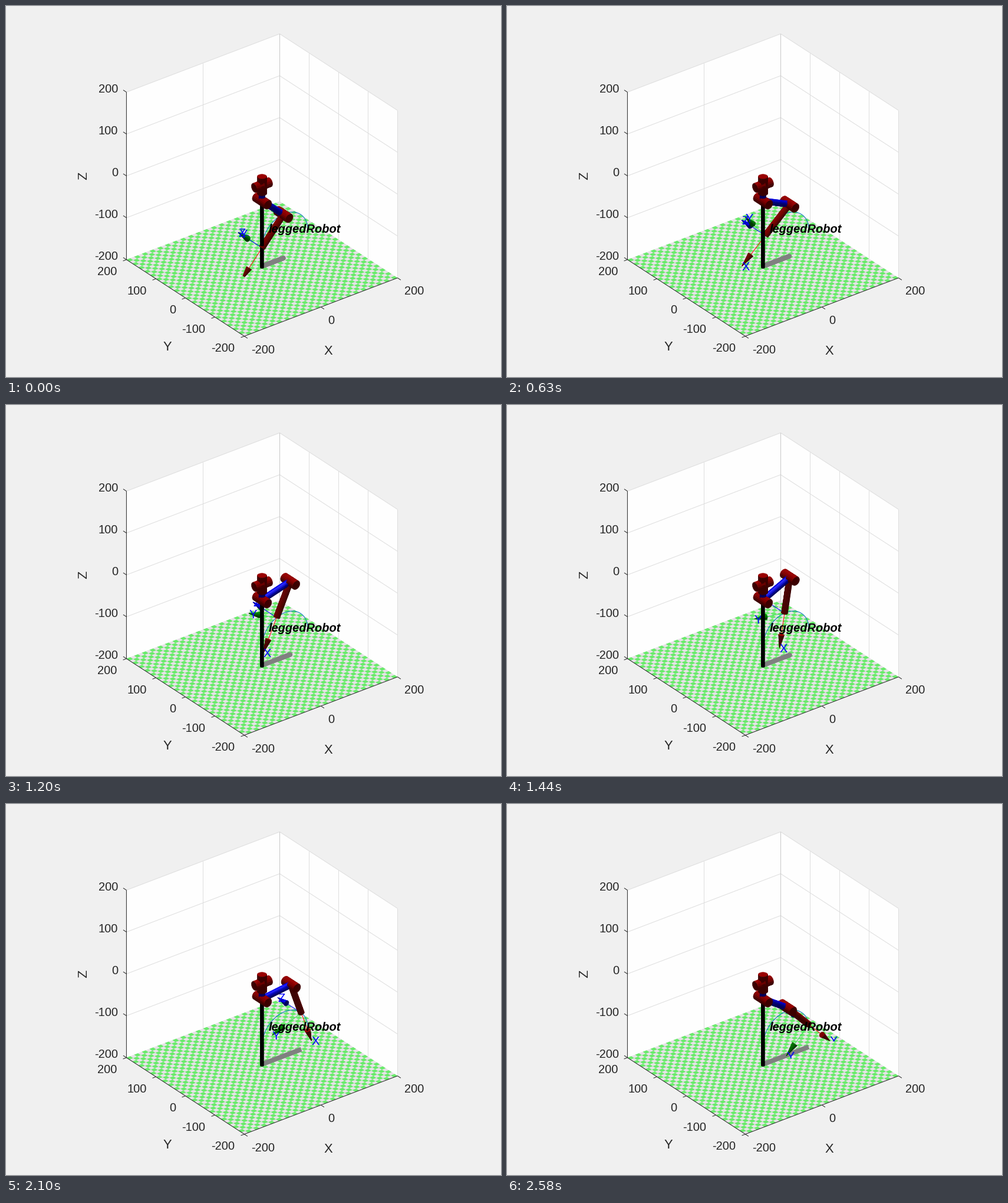
These frames come from a looping animation (840 px wide and 630 px high, 2610 ms). A matplotlib script:

```python
import numpy as np
import matplotlib.pyplot as plt
from matplotlib.animation import FuncAnimation
from matplotlib.collections import LineCollection, PolyCollection
from matplotlib.transforms import Bbox

W, H, DPI = 840, 630, 100
FRAMES, INTERVAL = 87, 30
FLOOR = -200
HIP = np.array([0, 0, -38.0])
THIGH, SHIN = 76, 82
ARROW, HEAD = 80, 30
STEP = np.radians(2.22)          # cruise speed along the foot path
RAMP = 13.6                      # frames spent accelerating

RED, GREEN, BLUE, BLACK = np.array(
    [(1, 0, 0), (0, 1, 0), (0, 0, 1.55), (0, 0, 0)])
INK = "#262626"
TO_EYE = np.array([-0.527, -0.687, 0.5])
HALFWAY = np.array([-0.304, -0.397, 0.866])


def project(points):
    p = np.asarray(points, float)
    x, y, z = p[..., 0], p[..., 1], p[..., 2]
    return np.stack([434.4 + 0.65 * x - 0.5 * y,
                     304 - 0.2475 * x - 0.325 * y - 0.711 * z], -1)


def px(size):
    return size * 72 / DPI


# ---------- solids ----------
def shade(normal, color):
    light = 0.23 + 0.37 * max(normal[2], 0)
    gloss = 0.2 * max(normal @ HALFWAY, 0) ** 20
    return np.clip(color * light + gloss * (color[2] > 0), 0, 1)


def tube(start, end, r0, r1, color, rings=4, sides=18):
    """Visible faces of a capped tube as (depth, outline, colour, centre z)."""
    start, end = np.asarray(start, float), np.asarray(end, float)
    axis = (end - start) / np.linalg.norm(end - start)
    helper = np.array([0, 0, 1.0]) if abs(axis[2]) < 0.9 else np.array([1.0, 0, 0])
    u = np.cross(helper, axis)
    u /= np.linalg.norm(u)
    v = np.cross(axis, u)
    a = np.linspace(0, 2 * np.pi, sides + 1)[:, None]
    circle = np.cos(a) * u + np.sin(a) * v
    t = np.linspace(0, 1, rings + 1)
    loops = [start + (end - start) * k + circle * (r0 + (r1 - r0) * k) for k in t]

    faces = []

    def add(outline, normal):
        if normal @ TO_EYE > 0:
            centre = outline.mean(0)
            faces.append((centre @ TO_EYE, project(outline),
                          shade(normal, color), centre[2]))

    for low, high in zip(loops, loops[1:]):
        for i in range(sides):
            quad = np.array([low[i], low[i + 1], high[i + 1], high[i]])
            n = np.cross(quad[2] - quad[0], quad[3] - quad[1])
            add(quad, n / np.linalg.norm(n))
    add(loops[0][:-1], -axis)
    if r1 > 0:
        add(loops[-1][:-1], axis)
    return faces


def joint(centre, axis):
    half = 20 * np.asarray(axis, float)
    return tube(centre - half, centre + half, 10, 10, RED)


def show_faces(collection, faces):
    faces = sorted((f for f in faces if f[3] > FLOOR), key=lambda f: f[0])
    collection.set_verts([f[1] for f in faces])
    colors = [f[2] for f in faces]
    collection.set_facecolor(colors)
    collection.set_edgecolor(colors)


# ---------- motion ----------
def foot_at(phase):
    return np.stack([60 - 60 * np.cos(phase), 0 * phase,
                     -150 + 61 * np.sin(phase)], -1)


def phase_at(n):
    """Quadratic rise to cruise speed, then constant."""
    if n < RAMP:
        return STEP * RAMP / 3 * (n / RAMP) ** 3
    return STEP * (n - RAMP * 2 / 3)


def solve_leg(foot):
    """Knee position for a given foot position, bent towards +x."""
    dx, _, dz = foot - HIP
    reach = min(np.hypot(dx, dz), THIGH + SHIN)
    bend = (THIGH**2 + reach**2 - SHIN**2) / (2 * THIGH * reach)
    angle = np.arctan2(dz, dx) + np.arccos(min(bend, 1))
    return HIP + THIGH * np.array([np.cos(angle), 0, np.sin(angle)])


# ---------- stage ----------
fig = plt.figure(figsize=(W / DPI, H / DPI), dpi=DPI, facecolor="#f0f0f0")
ax = fig.add_axes([0, 0, 1, 1])
ax.set_xlim(0, W)
ax.set_ylim(H, 0)
ax.axis("off")


def polygon(corners, color, z):
    ax.add_collection(PolyCollection([project(corners)], facecolors=[color],
                                     edgecolors="none", zorder=z))


def lines(segments, color, width, z):
    ax.add_collection(LineCollection([project(s) for s in segments], colors=[color],
                                     linewidths=px(width), zorder=z))


def label(x, y, text, size=20, **kw):
    kw = {"color": INK, "va": "center_baseline", "ha": "center", **kw}
    return ax.text(x, y, text, fontsize=px(size), family="Liberation Sans", **kw)


def draw_room():
    a, b = -200, 200
    polygon([(a, b, a), (b, b, a), (b, b, b), (a, b, b)], "#fefefe", 0)
    polygon([(b, b, a), (b, a, a), (b, a, b), (b, b, b)], "#fefefe", 0)

    grid = [[(0, b, a), (0, b, b)]]
    grid += [[(b, y, a), (b, y, b)] for y in (-200, -100, 0, 100)]
    grid += [[(a, b, z), (b, b, z), (b, a, z)] for z in (-100, 0, 100, 200)]
    lines(grid, "#dedede", 1, 1)
    lines([[(b, b, a), (b, b, b)]], "#c8c8c8", 1, 1)

    polygon([(a, a, a), (b, a, a), (b, b, a), (a, b, a)], "#e7e2e7", 1)
    size = 10
    tiles = []
    for i in range(40):
        for j in range(1 - i % 2, 40, 2):
            x, y = a + size * i, a + size * j
            tiles.append(project([(x, y, a), (x + size, y, a),
                                  (x + size, y + size, a), (x, y + size, a)]))
    ax.add_collection(PolyCollection(tiles, facecolors=["#69eb6b"],
                                     edgecolors="none", zorder=2))

    lines([[(a, b, b), (a, b, a), (a, a, a), (b, a, a)]], INK, 1, 3)
    ticks = [[(a, b, z), (a, b + 11, z)] for z in range(-200, 201, 100)]
    ticks += [[(a, y, a), (a - 9, y, a)] for y in range(-200, 201, 100)]
    ticks += [[(x, a, a), (x, a - 11, a)] for x in (-200, 0, 200)]
    lines(ticks, INK, 1, 3)

    for v in range(-200, 201, 100):
        label(190, 281.7 - 0.711 * v, v, ha="right")
        label(288.5 - 0.5 * v, 514.7 - 0.325 * v, v, ha="right")
    for v in (-200, 0, 200):
        label(546 + 0.65 * v, 532.7 - 0.25 * v, v, ha="left")
    label(547, 583.7, "X", 22)
    label(273.5, 576.7, "Y", 22)
    label(132, 288, "Z", 22, rotation=90, va="center")


draw_room()
ax.plot(*project(foot_at(np.linspace(0, np.pi, 80))).T, color="#0072bd",
        lw=px(1), zorder=5)
label(445.2, 377.7, "leggedRobot", ha="left", weight="bold", style="italic",
      color="black", zorder=12)

fixed = joint(np.zeros(3), (0, 0, 1)) + joint(np.zeros(3), (1, 0, 0))
fixed += joint(HIP, (0, 1, 0))
fixed += tube((0, 0, 0), HIP, 6.5, 6.5, BLUE)
fixed += tube((0, 0, -197), (0, 0, -20), 3.7, 3.7, BLACK, rings=20, sides=8)

shadow, = ax.plot([], [], color="#808080", lw=px(8), solid_capstyle="butt",
                  solid_joinstyle="round", zorder=4)
rods = LineCollection([], colors=["#ff0000", "#30e050", "#0000ff"],
                      linewidths=px(1), zorder=6)
heads = PolyCollection([], linewidths=0.4, zorder=7)
body = PolyCollection([], linewidths=0.4, zorder=9)
for item in (rods, heads, body):
    ax.add_collection(item)
letters = [label(0, 0, c, ha="left", color="#0000ff", zorder=8, clip_on=True)
           for c in "XYZ"]


def place_letter(text, tip):
    x, y = project(tip)
    text.set_position((x, y))
    # the floor hides whatever part of the letter sinks below it
    floor_y = y + 0.82 * (tip[2] - FLOOR) / 0.866
    text.set_clip_box(Bbox([[0, min(H - floor_y, H - 1)], [W, H]]))


def draw(n):
    foot = foot_at(phase_at(n))
    knee = solve_leg(foot)
    along = (foot - knee) / np.linalg.norm(foot - knee)
    side = np.array([along[2], 0, -along[0]])
    frame = [along, side, np.array([0, 1.0, 0])]

    cones, segments = [], []
    for axis, color, text in zip(frame, (RED, GREEN, BLUE), letters):
        tip = foot + ARROW * axis
        neck = tip - HEAD * axis
        cones += tube(neck, tip, 6, 0, color, rings=3)
        segments.append(project([foot, neck]))
        place_letter(text, tip)
    rods.set_segments(segments)
    show_faces(heads, cones)

    leg = tube(HIP, knee, 6.5, 6.5, BLUE, rings=6)
    leg += tube(knee, foot, 6.5, 6.5, RED, rings=6)
    leg += joint(knee, (0, 1, 0))
    show_faces(body, fixed + leg)

    ground = np.array([HIP, knee, foot])
    ground[:, 2] = FLOOR + 6
    shadow.set_data(*project(ground).T)
    return [shadow, rods, heads, body, *letters]


anim = FuncAnimation(fig, draw, frames=FRAMES, interval=INTERVAL,
                     repeat=True, repeat_delay=0, blit=False)
plt.show()
```
